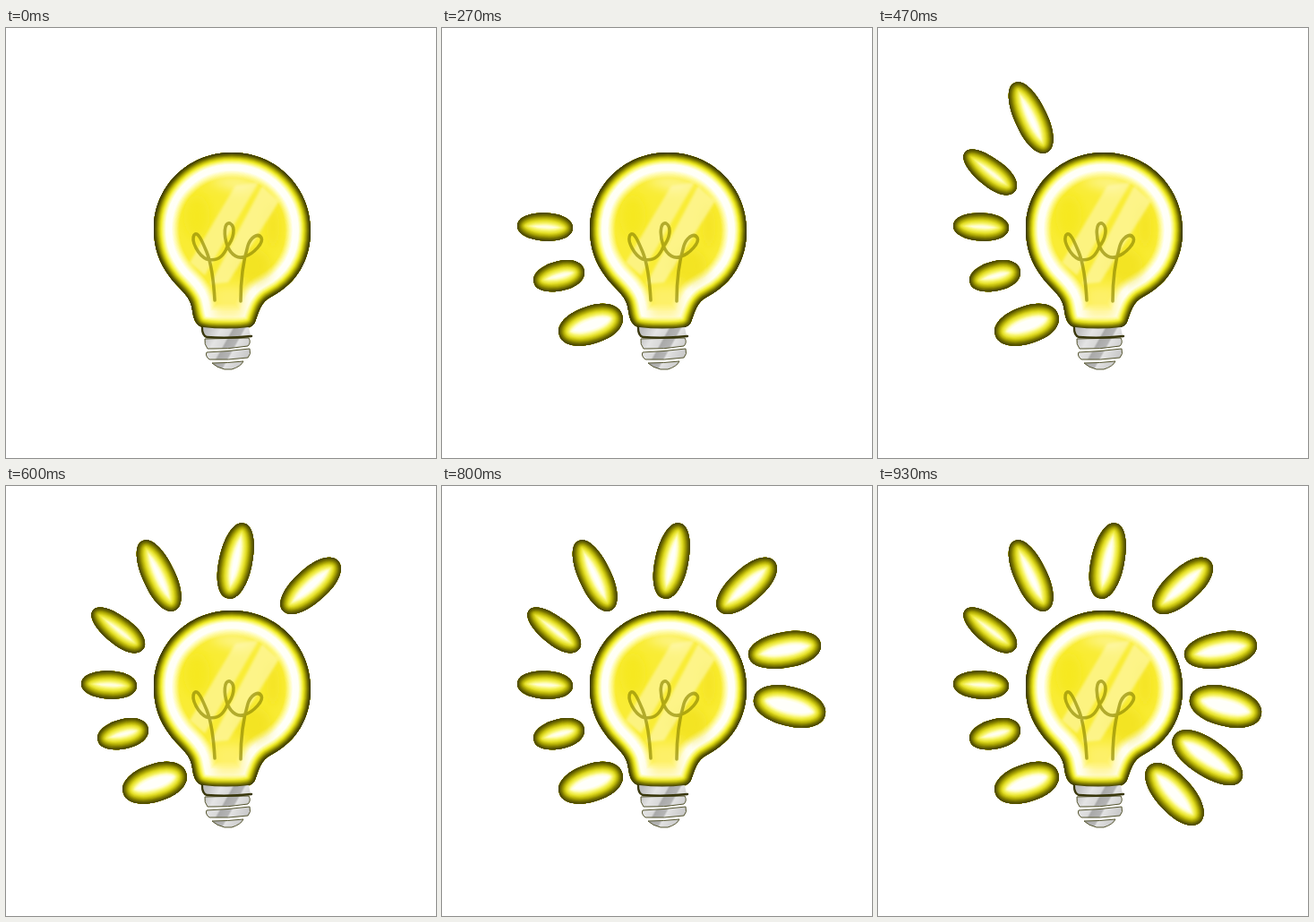
Animation of 480 by 480 pixels, one loop 0.99 s. Source, as an HTML page:

```html
<!DOCTYPE html>
<html lang="en">
<head>
<meta charset="utf-8">
<title>Light bulb</title>
<style>
  @property --n { syntax: "<integer>"; inherits: true; initial-value: 0; }
  html, body { margin: 0; width: 100%; height: 100%; overflow: hidden; background: #fff; }
  svg { display: block; width: 100%; height: 100%; animation: shine 990ms step-end infinite; }
  .ray { opacity: clamp(0, var(--n) - var(--i), 1); }

  /* --n is the number of lit rays */
  @keyframes shine {
    0% { --n: 0; }
    13.13% { --n: 1; }
    20.2% { --n: 2; }
    27.27% { --n: 3; }
    33.33% { --n: 4; }
    47.47% { --n: 5; }
    53.53% { --n: 6; }
    60.6% { --n: 7; }
    67.67% { --n: 8; }
    80.8% { --n: 9; }
    87.87% { --n: 10; }
    93.93%, 100% { --n: 11; }
  }
</style>
</head>
<body>
<svg viewBox="0 0 480 480">
  <defs>
    <filter id="soft" x="-20%" y="-20%" width="140%" height="140%"><feGaussianBlur stdDeviation="1.6"/></filter>
    <filter id="wash" x="-40%" y="-40%" width="180%" height="180%"><feGaussianBlur stdDeviation="6"/></filter>
    <linearGradient id="metal" x1="222" y1="340" x2="272" y2="368" gradientUnits="userSpaceOnUse">
      <stop offset="0" stop-color="#bdbdbd"/>
      <stop offset=".25" stop-color="#e4e4e4"/>
      <stop offset=".42" stop-color="#d8d8d8"/>
      <stop offset=".46" stop-color="#a9a9a9"/>
      <stop offset=".62" stop-color="#b4b4b4"/>
      <stop offset=".66" stop-color="#e2e2e2"/>
      <stop offset="1" stop-color="#c4c4c4"/>
    </linearGradient>
  </defs>

  <g id="rays"></g>

  <g fill="url(#metal)" stroke="#55552f" stroke-width="1" stroke-linejoin="round">
    <path d="M222 347L271 346Q274 351 270 355Q248 359 225 358Q221 353 222 347Z"/>
    <path d="M224 362Q248 361 272 358Q274 364 270 368Q248 371 227 370Q222 366 224 362Z"/>
    <path d="M230 374Q248 374 265 372Q262 378 252 381H244Q235 379 230 374Z"/>
  </g>

  <g id="bulb"></g>

  <g filter="url(#wash)">
    <ellipse cx="213" cy="210" rx="15" ry="24" fill="#f4e70c" opacity=".6"/>
    <ellipse cx="276" cy="266" rx="20" ry="20" fill="#efdc10" opacity=".55"/>
    <ellipse cx="298" cy="222" rx="7" ry="24" fill="#f2de14" opacity=".6"/>
    <path d="M232 288H268L264 324H232Z" fill="#fff27a" opacity=".75"/>
    <path d="M226 172Q250 158 284 174L262 184Z" fill="#fffbc0" opacity=".6"/>
  </g>
  <g filter="url(#soft)" fill="#fffac0">
    <path d="M256 176L282 172L222 276L205 262Z" opacity=".55"/>
    <path d="M286 176L305 193L248 284L228 286Z" opacity=".6"/>
  </g>
  <path d="M233 304C232 285 230 265 224 250C219 238 214 226 210 231C206 238 215 254 224 258C236 261 243 255 247 244C254 236 257 222 250 218C243 216 243 232 247 243C252 255 260 258 267 255C276 252 288 240 285 234C281 228 273 234 270 243C266 256 262 275 262 305"
    fill="none" stroke="#8c8600" stroke-opacity=".66" stroke-width="3.6" stroke-linecap="round" stroke-linejoin="round"/>

  <path d="M220 334Q246 337 271 334L273 344Q246 346 221 344Z" fill="url(#metal)"/>
  <path d="M219 335Q219 343 224 345Q248 347 274 344" fill="none" stroke="#39370d" stroke-width="2.4" stroke-linecap="round"/>
</svg>
<script>
  const NS = "http://www.w3.org/2000/svg";

  // Colour stops by distance from the outline: [px, r, g, b]
  const RAY_GLOW = [[0, 62, 59, 0], [3, 112, 108, 0], [6, 176, 171, 4], [9, 228, 223, 38],
    [12, 248, 245, 110], [14.5, 255, 254, 205], [17, 255, 255, 250]];
  const BULB_GLOW = [[0, 48, 46, 0], [3, 104, 100, 0], [6, 186, 181, 6], [8.5, 240, 236, 40],
    [11, 252, 250, 140], [14, 255, 255, 245], [20, 255, 255, 250], [24, 255, 251, 165], [29, 249, 236, 52]];

  const BULB = "M252 139C302 139 340 178 340 226C340 258 325 285 296 300C284 306 282 318 278 328" +
    "C275 335 268 336 250 336C230 336 219 336 214 331C208 325 209 316 206 307C202 296 190 288 183 278" +
    "C171 262 165 246 165 224C165 178 202 139 252 139Z";

  // cx, cy, half length, half width, angle, shift of the widest point
  const RAYS = [
    [166, 331.5, 37, 21, -18, 0.05],
    [130.5, 277, 29, 16.5, -14, 0.1],
    [115, 222, 31, 15.5, 3, 0.05],
    [125, 160.5, 35.5, 15.5, 38, 0.15],
    [170.5, 100, 43, 18, 65, 0.05],
    [256.5, 83.5, 43, 18.5, -78, -0.05],
    [340, 111.5, 41.5, 19, -42, 0.05],
    [382.5, 183, 41, 20, -10, 0.05],
    [388, 246, 41, 22, 14, 0],
    [368, 303.5, 45, 20.5, 34, -0.1],
    [331, 344, 42.5, 20.5, 48, 0]
  ];

  function add(parent, tag, attrs) {
    const el = document.createElementNS(NS, tag);
    for (const key in attrs) el.setAttribute(key, attrs[key]);
    return parent.appendChild(el);
  }

  function colorAt(stops, d) {
    const k = Math.max(1, stops.findIndex(s => s[0] >= d));
    const a = stops[k - 1], b = stops[k], t = (d - a[0]) / (b[0] - a[0]);
    return `rgb(${[1, 2, 3].map(c => Math.round(a[c] + (b[c] - a[c]) * t))})`;
  }

  // Fills a shape with a glow that follows its outline
  function glow(group, id, d, stops) {
    add(add(group, "clipPath", { id }), "path", { d });
    const g = add(group, "g", { "clip-path": `url(#${id})`, "stroke-linejoin": "round" });
    const depth = stops[stops.length - 1][0];
    add(g, "path", { d, fill: colorAt(stops, depth) });
    for (let r = depth; r > 0; r -= 0.75) {
      add(g, "path", { d, fill: "none", stroke: colorAt(stops, r), "stroke-width": 2 * r });
    }
  }

  function egg(a, b, shift) {
    const m = a * shift, l = m - 0.6 * (a + m), r = m + 0.6 * (a - m), h = 0.58 * b;
    return `M${-a} 0C${-a} ${-h} ${l} ${-b} ${m} ${-b}C${r} ${-b} ${a} ${-h} ${a} 0` +
      `C${a} ${h} ${r} ${b} ${m} ${b}C${l} ${b} ${-a} ${h} ${-a} 0Z`;
  }

  const rays = document.getElementById("rays");
  RAYS.forEach(([x, y, a, b, angle, shift], i) => {
    const g = add(rays, "g", {
      class: "ray", style: `--i:${i}`, transform: `translate(${x} ${y}) rotate(${angle})`
    });
    glow(g, "ray" + i, egg(a, b, shift), RAY_GLOW);
  });
  glow(document.getElementById("bulb"), "glass", BULB, BULB_GLOW);
</script>
</body>
</html>
```
